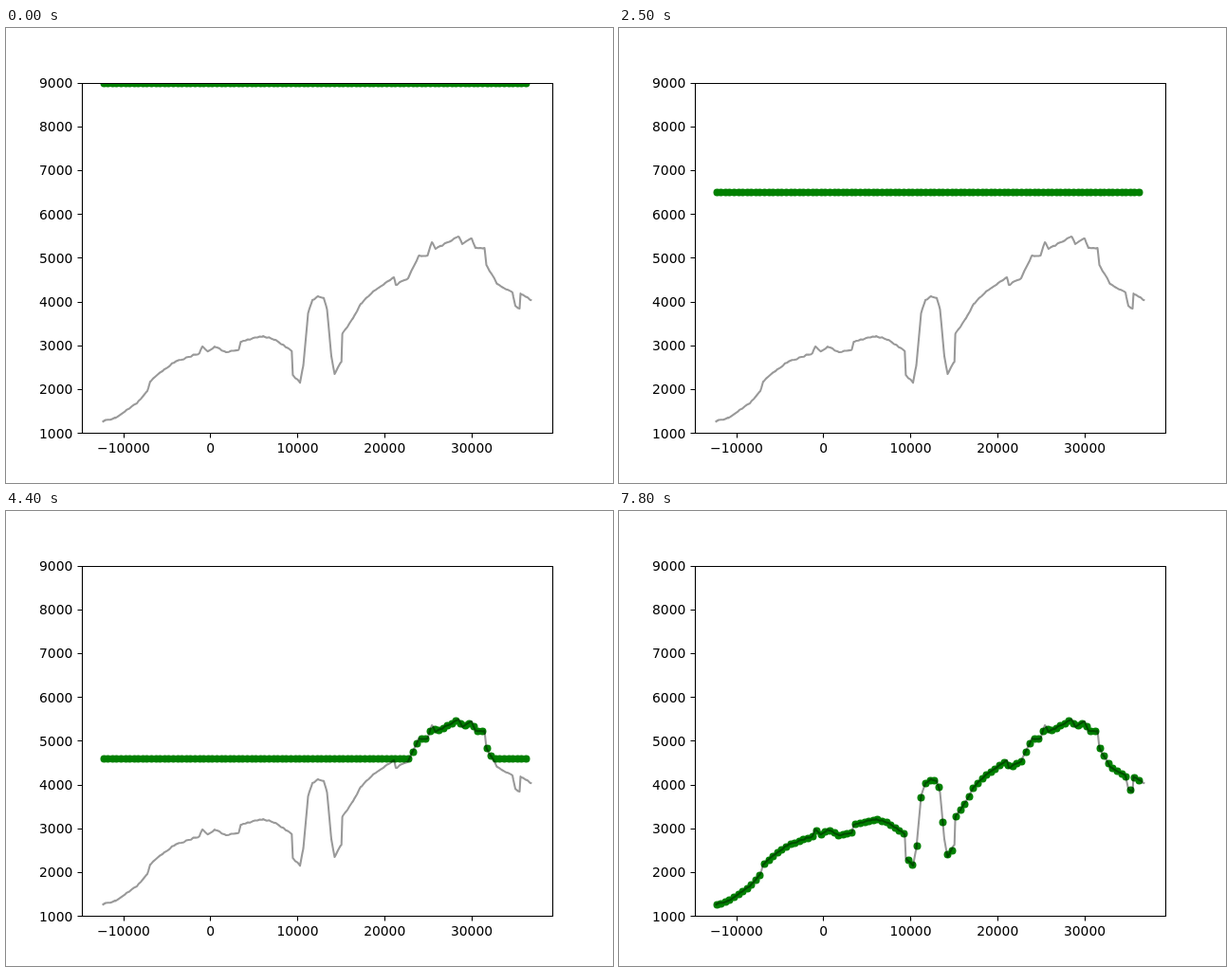
An HTML page for the animation above (10 s loop, 640x480 px).

```html
<!DOCTYPE html>
<html lang="en">
<head>
<meta charset="utf-8">
<title>Falling points settle on a profile</title>
<style>
html, body { margin: 0; width: 100%; height: 100%; overflow: hidden; background: #fff; }
svg { display: block; width: 640px; height: 480px; }
text { font: 13.889px "DejaVu Sans", sans-serif; fill: #000; }
.axis { fill: none; stroke: #000; stroke-width: 1.11; }
.profile { fill: none; stroke: #000; stroke-opacity: .4; stroke-width: 2.083; stroke-linejoin: round; stroke-linecap: square; }
.dots { fill: #008000; }
</style>
</head>
<body>
<svg viewBox="0 0 640 480">
  <clipPath id="area"><rect x="80" y="58" width="496" height="369"/></clipPath>
  <g clip-path="url(#area)">
    <g class="dots" id="dots"></g>
    <path class="profile" id="profile"/>
  </g>
  <path class="axis" id="axis"/>
  <g id="labels"></g>
</svg>
<script>
const LOOP = 10000, STEP = 100, LAST_STEP = 78;
const DOTS = 98, DOT_X = 102.545, DOT_GAP = 4.592, DOT_R = 4;
const ROUGHNESS = 0.7, GRAIN = 2.5;

// Key points of the profile on the stage
const keys = [
  [102.5, 415], [115, 411], [138, 396], [149, 383], [152, 373], [167, 360],
  [178.5, 352], [204, 343], [207, 336], [213, 341], [220, 336], [232, 342],
  [245.5, 339], [247.5, 331], [271, 325], [284, 329], [301.3, 341],
  [302.4, 366], [310, 374], [313.5, 356], [318.5, 301], [323, 287],
  [329, 283], [335, 285], [338.5, 297], [343, 346], [346.5, 365],
  [353.7, 352], [354.6, 323], [366, 306], [374, 291], [387, 278],
  [409, 263], [411, 271], [424, 264], [435.5, 240], [444.5, 240],
  [449, 226], [453, 233], [477, 220], [481, 228], [491, 222], [495, 232],
  [504.5, 232], [506.5, 250], [518, 270], [534, 279], [537, 293],
  [541.5, 296], [542.5, 280], [553.4, 287]
];

const byId = id => document.getElementById(id);
const snap = v => Math.floor(v + 0.5) + 0.5;
const valueY = v => 427.2 - (v - 1000) * 0.0462;
const valueX = v => 215.4 + v * 0.009176;

function add(parent, tag, attrs) {
  const el = document.createElementNS("http://www.w3.org/2000/svg", tag);
  for (const name in attrs) el.setAttribute(name, attrs[name]);
  return parent.appendChild(el);
}

function label(value, x, y, anchor) {
  add(byId("labels"), "text", { x, y, "text-anchor": anchor })
    .textContent = String(value).replace("-", "\u2212");
}

function seeded(seed) {
  return () => (seed = seed * 16807 % 2147483647) / 2147483647;
}

function heightAt(x) {
  const i = Math.max(1, keys.findIndex(k => k[0] >= x));
  const [x0, y0] = keys[i - 1], [x1, y1] = keys[i];
  return y0 + (y1 - y0) * (x - x0) / (x1 - x0);
}

function drawAxes() {
  let path = "M80.5 58.5H576.5V427.5H80.5Z";
  for (let v = -10000; v <= 30000; v += 10000) {
    path += `M${snap(valueX(v))} 427.5v5`;
    label(v, valueX(v) + 0.3, 448, "middle");
  }
  for (let v = 1000; v <= 9000; v += 1000) {
    path += `M80.5 ${snap(valueY(v))}h-5`;
    label(v, 70.3, Math.ceil(valueY(v)) + 5, "end");
  }
  byId("axis").setAttribute("d", path);
}

// Key points joined by slightly rough stretches
function drawProfile() {
  const random = seeded(41);
  const points = [...keys];
  for (let x = keys[0][0] + GRAIN; x < 553; x += GRAIN) {
    points.push([x, heightAt(x) + (random() * 2 - 1) * ROUGHNESS]);
  }
  points.sort((a, b) => a[0] - b[0]);
  byId("profile").setAttribute("d", "M" + points.map(p => p.join(" ")).join("L"));
}

function makeDot(_, i) {
  const x = DOT_X + DOT_GAP * i;
  const el = add(byId("dots"), "circle", { cx: snap(x), r: DOT_R });
  return { el, floor: heightAt(x) };
}

drawAxes();
drawProfile();
const dots = Array.from({ length: DOTS }, makeDot);

// The level drops by 100 per step; each dot stops at the profile
function render(time) {
  const step = Math.min(LAST_STEP, Math.floor(time % LOOP / STEP));
  const level = valueY(9000 - 100 * step);
  for (const { el, floor } of dots) el.setAttribute("cy", snap(Math.min(level, floor)));
}

const start = performance.now();
function tick() {
  render(performance.now() - start);
  requestAnimationFrame(tick);
}
tick();
</script>
</body>
</html>
```
